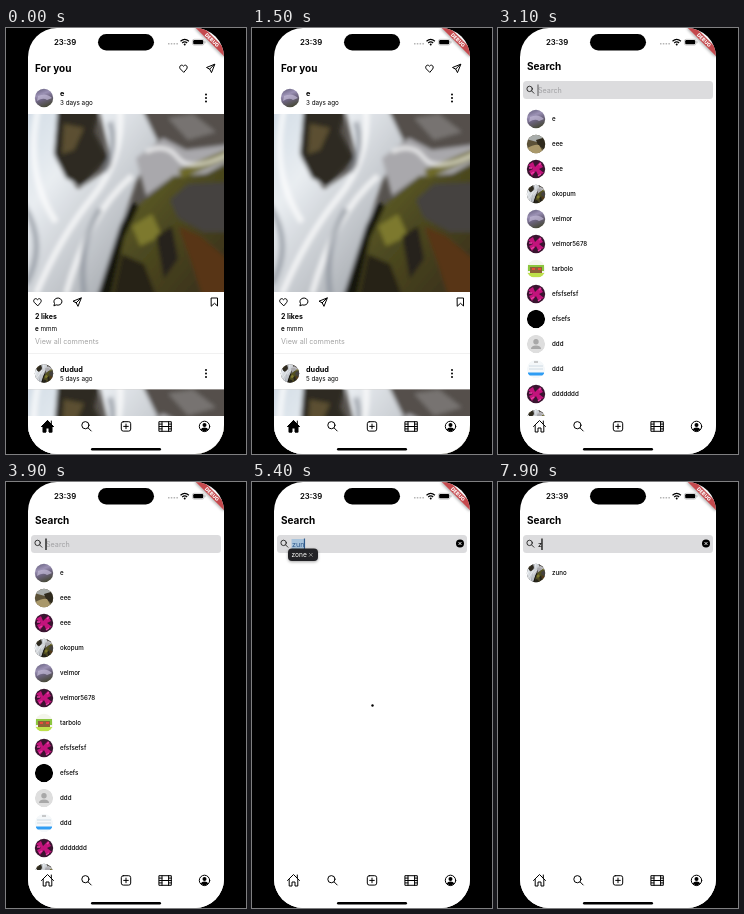
Animation, 240 px wide and 426 px high, one loop 8 s. Source, as an HTML page:

```html
<!DOCTYPE html>
<html lang="en">
<head>
<meta charset="utf-8">
<style>
  html, body { margin: 0; height: 100%; overflow: hidden; background: #000; }
  svg { display: block; width: 100vw; height: 100vh; }
  text { font-family: Inter, Roboto, sans-serif; fill: #000; }
  .title { font-size: 10px; font-weight: 700; }
  .bold { font-size: 7.3px; font-weight: 700; }
  .small { font-size: 6.3px; }
  .user { font-size: 6.2px; font-weight: 500; }
  .field { font-size: 7.2px; }
  .line { fill: none; stroke: #000; stroke-width: 1; stroke-linejoin: round; stroke-linecap: round; }
</style>
</head>
<body>
<svg viewBox="0 0 240 426">
  <defs>
    <clipPath id="screen"><rect x="22" width="196" height="426" rx="29"/></clipPath>
    <clipPath id="round"><circle r="9.2"/></clipPath>
    <filter id="soft" x="-10%" y="-10%" width="120%" height="120%"><feGaussianBlur stdDeviation="2"/></filter>
    <filter id="shade" x="-30%" y="-50%" width="160%" height="220%"><feDropShadow dx="0" dy="1" stdDeviation="1.5" flood-opacity=".35"/></filter>
    <linearGradient id="water" x1="0" y1="0" x2="1" y2="1">
      <stop offset="0" stop-color="#cfdae4"/><stop offset=".3" stop-color="#e9edf1"/>
      <stop offset=".6" stop-color="#c2c6cb"/><stop offset="1" stop-color="#8b8f94"/>
    </linearGradient>
    <linearGradient id="moss" x1="0" y1="0" x2="1" y2="1">
      <stop offset="0" stop-color="#69692b"/><stop offset=".45" stop-color="#4d4a20"/><stop offset="1" stop-color="#34291a"/>
    </linearGradient>
    <linearGradient id="dusk" x1="0" y1="0" x2=".4" y2="1">
      <stop offset="0" stop-color="#54506c"/><stop offset=".4" stop-color="#9b91b4"/>
      <stop offset=".65" stop-color="#6d6480"/><stop offset="1" stop-color="#4a4b3c"/>
    </linearGradient>

    <symbol id="fall" viewBox="0 0 196 178" preserveAspectRatio="xMidYMid slice">
      <rect width="196" height="178" fill="#57534f"/>
      <g filter="url(#soft)">
        <path d="M-9-9H30L28 45 50 75 84 52 70-9H140L128 30 108 68 98 98 68 187H-9Z" fill="url(#water)"/>
        <path d="M112-9H205V32L150 42 128 24Z" fill="#55504b"/>
        <path d="M140 4L165 0 188 18 160 26Z" fill="#777371"/>
        <path d="M30-9H72L66 18 80 44 54 72 38 64 26 40Z" fill="#2f2b20"/>
        <path d="M36 10L56 14 46 36 34 40Z" fill="#5b5030"/>
        <path d="M108 44L135 24 158 36 205 30V55L140 66 118 82Z" fill="#a9a8ac"/>
        <path d="M68 187L92 112 104 88 122 98 96 187Z" fill="#15130f"/>
        <path d="M82 187L96 124 112 90 145 62 178 60 205 45V187Z" fill="url(#moss)"/>
        <path d="M142 86L160 70 205 68V118L176 118 150 104Z" fill="#45423f"/>
        <path d="M150 112L172 122 205 150V187H176L164 150Z" fill="#583519"/>
        <path d="M84 187L94 140 116 150 130 187Z" fill="#252319"/>
        <path d="M104 112L124 100 134 122 112 132Z" fill="#7d792e"/>
        <path d="M128 122L144 112 150 145 136 165Z" fill="#26221a"/>
        <path d="M152 60L205 38" stroke="#6e6b2b" stroke-width="9"/>
        <g fill="none" stroke="#fff" stroke-opacity=".7" stroke-width="6">
          <path d="M10-5Q-4 60 28 108"/><path d="M92-5Q96 45 64 84T8 180"/>
          <path d="M104 62Q60 100 38 180"/><path d="M118 38Q138 28 150 44T205 38" stroke-width="4"/>
        </g>
        <path d="M-5 90Q20 130-2 170M72 95Q50 130 56 180M82 8Q90 36 76 58" fill="none" stroke="#868d96" stroke-opacity=".6" stroke-width="6"/>
      </g>
    </symbol>

    <g id="av-fall"><use href="#fall" x="-10" y="-10" width="20" height="20"/></g>
    <g id="av-dusk">
      <rect x="-10" y="-10" width="20" height="20" fill="url(#dusk)"/>
      <path d="M-6-2Q2-6 8 0L3 2Q-1-1-7 3Z" fill="#c5bdd9" opacity=".7"/>
    </g>
    <g id="av-road">
      <rect x="-10" y="-10" width="20" height="20" fill="#5c5238"/>
      <path d="M-10-10H10V-4L1-2-10-5Z" fill="#a9adab"/>
      <path d="M0-4L10-7V7L2 1Z" fill="#2f2a1d"/>
      <path d="M-10 5Q-2 0 3 1L8 10H-4Z" fill="#a9986a"/>
    </g>
    <g id="av-flower">
      <rect x="-10" y="-10" width="20" height="20" fill="#3a1430"/>
      <path d="M-8-4L-3-7-1-2 4-7 7-2 3 0 8 4 2 6 0 2-4 7-7 2-3 0Z" fill="#c3137c"/>
      <path d="M-5 5L-2 3M3-4L5-6M2 7L5 5M-7-1H-4" stroke="#e83fa6" stroke-width="1.5"/>
    </g>
    <g id="av-game">
      <rect x="-10" y="-10" width="20" height="20" fill="#f4f5ec"/>
      <path d="M-8-4H8V2H-8Z" fill="#8cc63f"/><path d="M-6-2H6V4H-6Z" fill="#8b6237"/>
      <path d="M-10 4H10V8H-10Z" fill="#bde04a"/><path d="M-4 0H-1M2 0H5" stroke="#e74c3c" stroke-width="2"/>
    </g>
    <g id="av-black"><circle r="9.2"/></g>
    <g id="av-blank">
      <circle r="9.2" fill="#dedede"/>
      <circle cy="-2.2" r="2.7" fill="#a8a8a8"/><path d="M-5 5Q-5 1.5 0 1.5T5 5Z" fill="#a8a8a8"/>
    </g>
    <g id="av-form">
      <circle r="9.2" fill="#f5f8fa"/>
      <path d="M-7-3H7M-7 0H7" stroke="#cfdbe4"/><path d="M-8 5H8" stroke="#2f9df4" stroke-width="3"/>
      <path d="M-2-7H2" stroke="#999"/>
    </g>

    <path id="heart" class="line" d="M0 3.6L-3.3.3C-5-1.8-2.2-5 0-2.3 2.2-5 5-1.8 3.3.3Z"/>
    <path id="send" class="line" d="M4-4L-4-.8-.8.8.8 4ZM4-4L-.8.8"/>
    <g id="lens" class="line"><circle cx="-.8" cy="-.8" r="3.6"/><path d="M2 2L5 5"/></g>
    <g id="more"><circle cy="-3.6" r="1"/><circle r="1"/><circle cy="3.6" r="1"/></g>
  </defs>

  <g clip-path="url(#screen)">
    <rect x="22" width="196" height="426" fill="#fff"/>

    <g id="home">
      <text class="title" x="29" y="43.7">For you</text>
      <use href="#heart" x="177.5" y="40.5"/><use href="#send" x="204.5" y="40.3"/>
      <g id="posts"></g>
      <use href="#heart" x="31.5" y="274"/>
      <path class="line" d="M48 277.5L48.5 275.5A4 3.6 0 1 1 50.5 277Z"/>
      <use href="#send" x="71" y="274"/>
      <path class="line" d="M205.5 270H211.5V278L208.5 275.3 205.5 278Z"/>
      <text class="bold" x="29" y="291" style="font-size:7px">2 likes</text>
      <text class="small" x="29" y="303"><tspan font-weight="700">e</tspan> mmm</text>
      <text x="29" y="316.3" style="font-size:7.2px;fill:#a3a3a3">View all comments</text>
      <path d="M22 325.5H218" stroke="#f1f1f1"/>
    </g>

    <g id="search">
      <text class="title" x="29" y="42">Search</text>
      <rect x="25" y="53" width="190" height="18" rx="3.5" fill="#dcdcde"/>
      <use href="#lens" transform="translate(32.2 61.5) scale(.75)"/>
      <g id="list"></g>
      <g id="result"></g>
      <circle id="dot" cx="120.5" cy="223.5" r="1.2"/>
      <rect id="mark" x="39.5" y="57" height="10.5" fill="#a9c4dc"/>
      <text id="hint" class="field" x="40" y="64.8" style="fill:#a0a0a3">Search</text>
      <text id="typed" class="field" x="40" y="64.8"></text>
      <rect id="caret" y="56.5" width="1.2" height="11.5"/>
      <g id="clear">
        <circle cx="208" cy="61.5" r="4"/><path d="M206.6 60.1L209.4 62.9M209.4 60.1L206.6 62.9" stroke="#fff" stroke-width=".9"/>
      </g>
      <g id="bubble" filter="url(#shade)">
        <rect x="36" y="66.5" width="30" height="12.5" rx="4" fill="#242426"/>
        <text x="39.5" y="75" style="font-size:6.6px;fill:#fff">zone</text>
        <path d="M57 71L60.6 74.6M60.6 71L57 74.6" stroke="#a8a8a8" stroke-width=".7"/>
      </g>
    </g>

    <rect x="22" y="388" width="196" height="38" fill="#fff"/>
    <path class="line" d="M35.5 398.5L41.5 392.5 47.5 398.5M37.2 397.5V404H40V400H43V404H45.8V397.5M45.3 393V396"/>
    <path id="homeFill" d="M35 399L41.5 392 48 399H46.3V404.5H43V400H40V404.5H36.7V399Z"/>
    <use href="#lens" x="80.2" y="398"/>
    <rect class="line" x="115.3" y="393.7" width="9.4" height="9.4" rx="2"/>
    <path class="line" d="M117.7 398.4H122.3M120 396.1V400.7"/>
    <path class="line" d="M153.3 393.7H165.3V403.3H153.3ZM156 393.7V403.3M162.6 393.7V403.3M156 398.5H162.6M153.3 396.1H156M153.3 398.5H156M153.3 400.9H156M162.6 396.1H165.3M162.6 398.5H165.3M162.6 400.9H165.3"/>
    <circle class="line" cx="198.5" cy="398.4" r="5.2"/>
    <circle cx="198.5" cy="396.9" r="2"/><path d="M194.8 401.6Q195.5 399.6 198.5 399.6T202.2 401.6Q200.5 403.4 198.5 403.4T194.8 401.6Z"/>
    <rect x="85" y="420" width="70" height="2.4" rx="1.2"/>

    <rect x="92" y="6" width="56" height="16.5" rx="8.25"/>
    <text x="48" y="17.2" style="font-size:7.8px;font-weight:600">23:39</text>
    <path d="M162 15.8H172" stroke="#b5b5b5" stroke-width="1.4" stroke-dasharray="1.5 1.3"/>
    <path d="M174.5 13.3Q178.7 9.5 182.9 13.3M176.2 15Q178.7 12.9 181.2 15" fill="none" stroke="#000" stroke-width="1.2"/>
    <circle cx="178.7" cy="16.5" r="1"/>
    <rect x="186.4" y="11.3" width="11.6" height="5.8" rx="1.8" fill="none" stroke="#a8a8a8" stroke-width=".6"/>
    <rect x="187.2" y="12.1" width="10" height="4.2" rx="1.1"/><path d="M199 13.3V15.2" stroke="#a8a8a8" stroke-width=".8"/>
    <g transform="translate(218 0) rotate(45)">
      <rect x="-20" y="14" width="40" height="6" fill="#c44a4e" filter="url(#shade)"/>
      <text y="18.8" text-anchor="middle" style="font-size:5px;font-weight:800;fill:#fff">DEBUG</text>
    </g>
  </g>
</svg>
<script>
const $ = id => document.getElementById(id);
const show = (id, on) => $(id).style.display = on ? '' : 'none';

const avatar = (kind, y) =>
  `<g transform="translate(38 ${y})"><g clip-path="url(#round)"><use href="#av-${kind}"/></g></g>`;
const row = ([name, kind], i) =>
  avatar(kind, 91 + 25 * i) + `<text class="user" x="54" y="${93.1 + 25 * i}">${name}</text>`;
const post = (name, kind, age, y) => avatar(kind, y) +
  `<text class="bold" x="54" y="${y - 2}">${name}</text>
   <text class="small" x="54" y="${y + 7.3}">${age} days ago</text>
   <use href="#more" x="200" y="${y}"/>
   <use href="#fall" x="22" y="${y + 16}" width="196" height="178"/>`;

const users = [
  ['e', 'dusk'], ['eee', 'road'], ['eee', 'flower'], ['okopum', 'fall'], ['velmor', 'dusk'],
  ['velmor5678', 'flower'], ['tarbolo', 'game'], ['efsfsefsf', 'flower'], ['efsefs', 'black'],
  ['ddd', 'blank'], ['ddd', 'form'], ['ddddddd', 'flower'], ['dudud', 'fall'],
];
$('posts').innerHTML = post('e', 'dusk', 3, 70) + post('dudud', 'fall', 5, 345.5);
$('list').innerHTML = users.map(row).join('');
$('result').innerHTML = row(['zuno', 'fall'], 0);

const LOOP = 8000, OPEN = 2525, LOADING = 100;
const edits = [
  [OPEN, ''], [4980, 'z'], [5180, 'zu'], [5380, 'zun'], [5580, 'zuno'],
  [7580, 'zun'], [7680, 'zu'], [7780, 'z'],
];

// Solid for half a second, fade out, rest, fade in.
function blink(ms) {
  const p = ms % 1000 / 1000;
  return p < .75 ? Math.min(1, Math.max(0, (.65 - p) / .15)) : Math.max(0, (p - .85) / .15);
}

function draw() {
  const t = performance.now() % LOOP;
  const searching = t >= OPEN;
  show('home', !searching);
  show('homeFill', !searching);
  show('search', searching);
  if (searching) {
    const [since, text] = edits.filter(e => e[0] <= t).pop();
    const loading = text && t - since < LOADING;
    const suggesting = text === 'zun' && t < 6000;
    show('list', !text);
    show('hint', !text);
    show('clear', text);
    show('dot', loading);
    show('result', text && !loading);
    show('bubble', suggesting);
    show('mark', suggesting);
    $('typed').textContent = text;
    $('typed').style.fill = suggesting ? '#2f5a8c' : '#000';
    const width = text ? $('typed').getComputedTextLength() : 0;
    $('mark').setAttribute('width', width + 1);
    $('caret').setAttribute('x', 39.4 + width);
    $('caret').style.fill = suggesting ? '#2f5a8c' : '#000';
    $('caret').style.opacity = blink(t - since);
  }
  requestAnimationFrame(draw);
}
draw();
</script>
</body>
</html>
```
